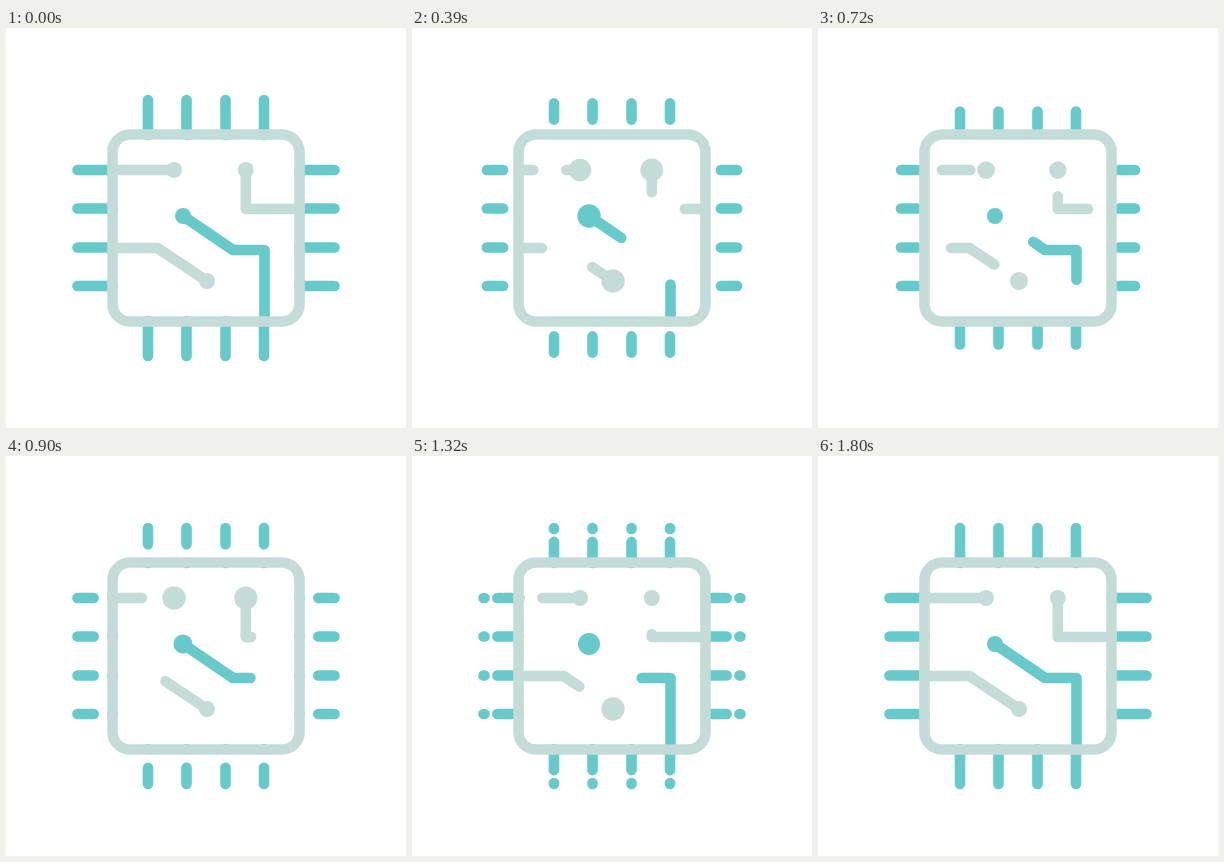
An HTML page that plays this animation: 400 by 400 pixels, repeating every 1830 ms.

```html
<!DOCTYPE html>
<html lang="en">
<head>
<meta charset="utf-8">
<title>Chip</title>
<style>
  html, body { margin: 0; width: 100%; height: 100%; overflow: hidden; background: #fff; }
  svg { display: block; width: 100%; height: 100%; }
  path, rect { fill: none; stroke-width: 10.6; stroke-linecap: round; stroke-linejoin: round; }
  .teal { stroke: #66c9ca; }
  .pale { stroke: #c4dcd7; }
  circle.teal { fill: #66c9ca; stroke: none; }
  circle.pale { fill: #c4dcd7; stroke: none; }
</style>
</head>
<body>
<svg id="stage" viewBox="0 0 400 400"></svg>
<script>
const LOOP = 1830, STEP = 30;
const MAX_GAP = 0.537;
const stage = document.getElementById('stage');

function add(tag, attrs) {
  const el = document.createElementNS('http://www.w3.org/2000/svg', tag);
  for (const key in attrs) el.setAttribute(key, attrs[key]);
  return stage.appendChild(el);
}

const line = (color, d) => add('path', { class: color, d, pathLength: 1 });

// Pins run from their outer tip to the middle of the frame.
const pins = [142, 180.5, 219.5, 258].flatMap(p => [
  `M${p} 72V107`, `M${p} 328V293`, `M71.5 ${p}H106.5`, `M328.5 ${p}H293.5`
]).map(d => line('teal', d));

const traces = [
  line('teal', 'M177 188L227 222H258.5V293'),
  line('pale', 'M106.5 142H168'),
  line('pale', 'M239.8 142V181H293.5'),
  line('pale', 'M201 253L151.5 220H106.5')
];

add('rect', { class: 'pale', x: 106.5, y: 106.5, width: 187, height: 187, rx: 17.5 });

// Each dot swells during its pulses, given as consecutive time marks.
const dots = [
  { color: 'pale', x: 168, y: 142, marks: [0, 620, 1260], skew: 1 },
  { color: 'pale', x: 239.8, y: 142, marks: [10, 630, 1290], skew: 1 },
  { color: 'teal', x: 177, y: 188, marks: [20, 740, 1690], skew: 0.85 },
  { color: 'pale', x: 201, y: 253, marks: [100, 890, 1740], skew: 0.8 }
].map(dot => ({ ...dot, el: add('circle', { class: dot.color, cx: dot.x, cy: dot.y }) }));

const progress = (t, from, to) => Math.min(1, Math.max(0, (t - from) / (to - from)));
const smooth = p => p * p * (3 - 2 * p);

// Shows a cyclic window of a line that begins at start and leaves a gap open.
function showWindow(el, start, gap) {
  if (gap < 0.002) {
    el.setAttribute('stroke-dasharray', 'none');
    return;
  }
  const from = start - Math.floor(start + 1e-6);
  const length = 1 - gap;
  const wrapped = from + length - 1;
  const split = wrapped > 0.002;
  el.setAttribute('stroke-dasharray', split ? `${wrapped} ${gap} 1 1` : `${length} 2`);
  el.setAttribute('stroke-dashoffset', split ? 0 : -from);
}

function radius({ marks, skew }, t) {
  const [a, b, c] = marks;
  const p = t < b ? progress(t, a, b) : progress(t, b, c);
  return 8 + 1.95 * (1 - Math.cos(2 * Math.PI * p ** skew));
}

function render(t) {
  const gap = MAX_GAP * (smooth(progress(t, 0, 240)) - smooth(progress(t, 1140, 1620)));
  const travel = progress(t, 240, 1580);
  pins.forEach(el => showWindow(el, 5 * travel + gap, gap));
  traces.forEach(el => showWindow(el, 1 - 2 * travel, gap));
  dots.forEach(dot => dot.el.setAttribute('r', radius(dot, t)));
}

function tick() {
  render(Math.floor(performance.now() % LOOP / STEP) * STEP);
  requestAnimationFrame(tick);
}
tick();
</script>
</body>
</html>
```
